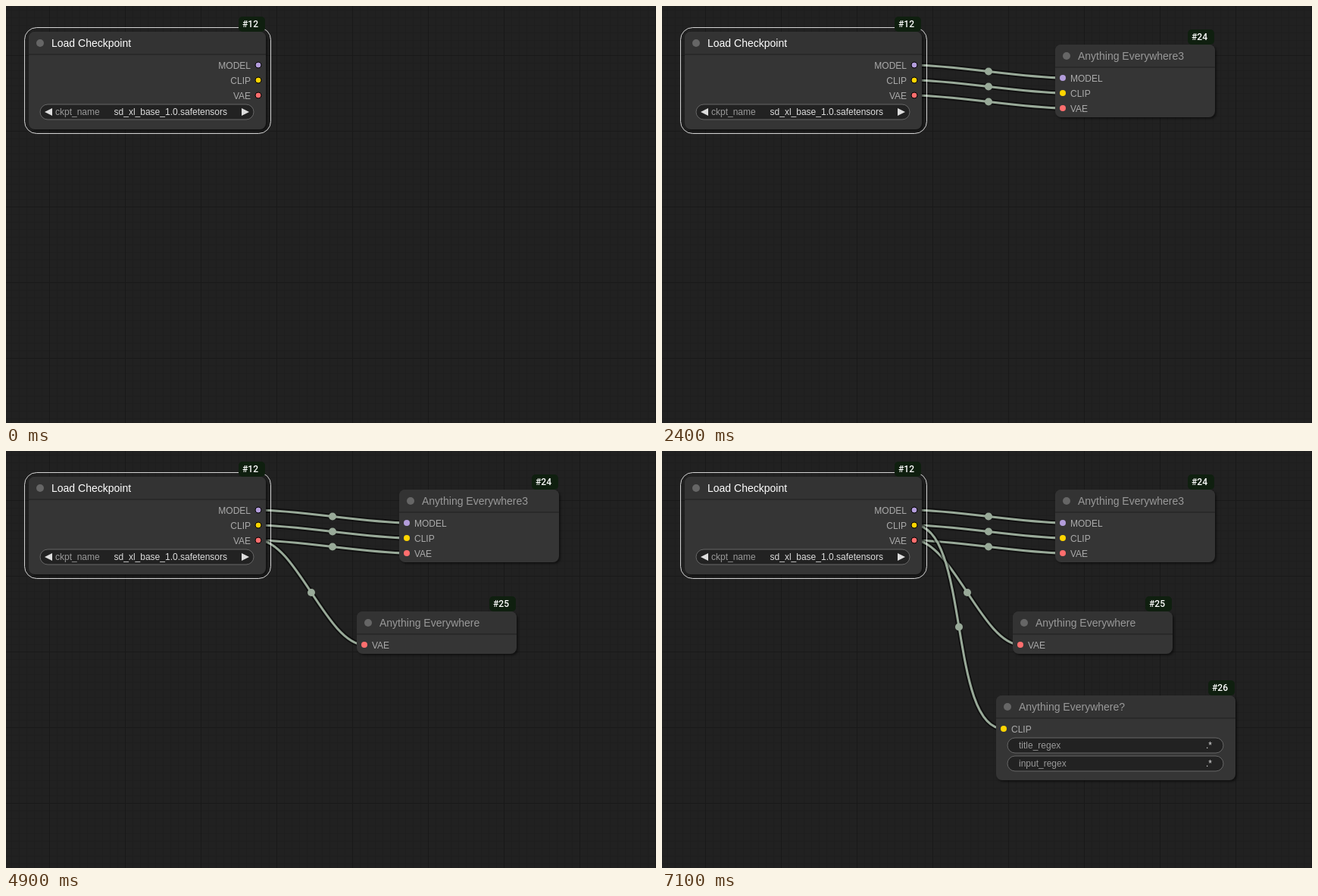
Write an HTML page with a canvas that moves like this. It is 858x551 px and loops after 8000 ms.

```html
<!DOCTYPE html>
<html lang="en">
<head>
<meta charset="utf-8">
<title>Node graph</title>
<style>
  html, body { margin: 0; width: 100%; height: 100%; overflow: hidden; background: #212121; }
  canvas { display: block; }
</style>
</head>
<body>
<canvas id="stage" width="858" height="551"></canvas>
<script>
const LOOP = 8000, STEP = 100;
const W = 858, H = 551, TITLE = 30;
const SANS = '"Liberation Sans", Arial, sans-serif';
const UI = 'Roboto, sans-serif';
const COLORS = { MODEL: '#b39ddb', CLIP: '#ffd500', VAE: '#ff6e6e' };
const LINK = '#99aa99', DRAG = '#aaffaa';
const ctx = document.getElementById('stage').getContext('2d');

// x, y is the corner below the title bar; each node appears at time "at".
const nodes = [
  { at: 0, x: 30, y: 64, w: 312, h: 99, id: '#12', title: 'Load Checkpoint', selected: true,
    outputs: ['MODEL', 'CLIP', 'VAE'],
    widgets: [{ y: 66, name: 'ckpt_name', value: 'sd_xl_base_1.0.safetensors', combo: true }] },
  { at: 2400, x: 519, y: 81, w: 210, h: 66, id: '#24', title: 'Anything Everywhere3',
    inputs: ['MODEL', 'CLIP', 'VAE'] },
  { at: 4600, x: 463, y: 242, w: 210, h: 26, id: '#25', title: 'Anything Everywhere',
    inputs: ['VAE'] },
  { at: 7100, x: 441, y: 353, w: 315, h: 82, id: '#26', title: 'Anything Everywhere?',
    inputs: ['CLIP'],
    widgets: [{ y: 26, name: 'title_regex', value: '.*' }, { y: 50, name: 'input_regex', value: '.*' }] }
];
const loader = nodes[0];

// Pointer positions, one per step; the last one holds until "end".
const drags = [
  { start: 900, end: 1500, slot: 0, path: [[352, 78], [400, 79], [455, 80], [500, 81], [519, 81]] },
  { start: 3600, end: 4000, slot: 2, path: [[360, 151], [402, 220], [438, 291], [463, 242]] },
  { start: 5700, end: 6300, slot: 1, path: [[352, 130], [383, 205], [415, 290], [436, 340], [441, 353]] }
];

// hover rows: [time, item, strength]
const menus = [
  { start: 1500, end: 2400, x: 509, y: 50,
    hover: [[1700, 0, .5], [1800, 0, 1], [2000, 1, .5], [2100, 2, .5], [2200, 2, 1]] },
  { start: 4000, end: 4600, x: 453, y: 211, hover: [[4200, 0, .5], [4300, 0, 1]] },
  { start: 6300, end: 7100, x: 431, y: 322, hover: [[6600, 1, .5], [6700, 1, 1]] }
];
const menuItems = ['Anything Everywhere', 'Anything Everywhere?', 'Anything Everywhere3'];
const tooltip = { start: 4800, end: 4900, x: 403, y: 187 };

const active = (span, t) => t >= span.start && t < span.end;
const slotY = (node, i) => node.y + 14 + 20 * i;
const outX = node => node.x + node.w - 9;

function rect(x, y, w, h, color) {
  ctx.fillStyle = color;
  ctx.fillRect(x, y, w, h);
}

function round(x, y, w, h, r, fill, stroke) {
  ctx.beginPath();
  ctx.roundRect(x, y, w, h, r);
  if (fill) { ctx.fillStyle = fill; ctx.fill(); }
  if (stroke) { ctx.strokeStyle = stroke; ctx.lineWidth = 1; ctx.stroke(); }
}

function dot(x, y, r, fill, stroke) {
  ctx.beginPath();
  ctx.arc(x, y, r, 0, 2 * Math.PI);
  ctx.fillStyle = fill;
  ctx.fill();
  if (stroke) { ctx.strokeStyle = stroke; ctx.lineWidth = 1; ctx.stroke(); }
}

function text(str, x, y, color, font, align = 'left') {
  ctx.font = font;
  ctx.textAlign = align;
  ctx.fillStyle = color;
  ctx.fillText(str, x, y);
}

function withShadow(color, blur, offset, draw) {
  ctx.save();
  ctx.shadowColor = color;
  ctx.shadowBlur = blur;
  ctx.shadowOffsetX = ctx.shadowOffsetY = offset;
  draw();
  ctx.restore();
}

function drawGrid() {
  rect(0, 0, W, H, '#212121');
  for (const [gap, color] of [[10, '#1e1e1e'], [100, '#191919']]) {
    for (let x = 57 % gap; x < W; x += gap) rect(x, 0, 1, H, color);
    for (let y = 65 % gap; y < H; y += gap) rect(0, y, W, 1, color);
  }
}

function drawLink(x1, y1, x2, y2, color, loose) {
  const pull = Math.hypot(x2 - x1, y2 - y1) / 4;
  ctx.beginPath();
  ctx.moveTo(x1, y1);
  ctx.bezierCurveTo(x1 + pull, y1, loose ? x2 : x2 - pull, y2, x2, y2);
  ctx.lineJoin = 'round';
  for (const [width, style] of [[7, 'rgba(0,0,0,.5)'], [3, color]]) {
    ctx.lineWidth = width;
    ctx.strokeStyle = style;
    ctx.stroke();
  }
  if (!loose) dot((x1 + x2) / 2, (y1 + y2) / 2, 5, color);
}

function drawLinks(node) {
  (node.inputs || []).forEach((name, i) => {
    const from = loader.outputs.indexOf(name);
    drawLink(outX(loader), slotY(loader, from), node.x + 10, slotY(node, i), LINK);
  });
}

function drawWidget(node, { y, name, value, combo }) {
  const left = node.x + 15, top = node.y + y, right = node.x + node.w - 15;
  const font = '12px ' + SANS;
  round(left, top, right - left, 20, 10, '#222', '#666');
  if (combo) {
    for (const [edge, dir] of [[left, 1], [right, -1]]) {
      ctx.beginPath();
      ctx.moveTo(edge + 16 * dir, top + 5);
      ctx.lineTo(edge + 6 * dir, top + 10);
      ctx.lineTo(edge + 16 * dir, top + 15);
      ctx.fillStyle = '#ddd';
      ctx.fill();
    }
  }
  text(name, left + (combo ? 20 : 15), top + 14, '#999', font);
  text(value, right - (combo ? 35 : 15), top + 14, '#ddd', font, 'right');
}

function drawNode(node) {
  const { x, y, w, h } = node, top = y - TITLE, font = '12px ' + SANS;
  withShadow('rgba(0,0,0,.5)', 3, 2, () => round(x, top, w + 1, h + TITLE, 8, '#353535'));
  round(x, top, w + 1, TITLE, [8, 8, 0, 0], '#333');
  rect(x, y - 1, w + 1, 2, 'rgba(0,0,0,.2)');
  dot(x + 15, y - 15, 5, '#666');
  text(node.title, x + 30, y - 10, node.selected ? '#fff' : '#999', '14px ' + SANS);
  if (node.selected) round(x - 5.5, top - 5.5, w + 13, h + TITLE + 11, 16, null, 'rgba(255,255,255,.8)');

  (node.inputs || []).forEach((name, i) => {
    dot(x + 10, slotY(node, i), 4, COLORS[name]);
    text(name, x + 20, slotY(node, i) + 5, '#aaa', font);
  });
  (node.outputs || []).forEach((name, i) => {
    dot(outX(node), slotY(node, i), 4, COLORS[name], '#000');
    text(name, outX(node) - 10, slotY(node, i) + 5, '#aaa', font, 'right');
  });
  (node.widgets || []).forEach(widget => drawWidget(node, widget));

  round(x + w - 35, top - 20, 35, 20, 5, '#0f1f0f');
  text(node.id, x + w - 30, top - 6, '#fff', '500 12px ' + UI);
}

function drawDrag({ start, slot, path }, t) {
  const [x, y] = path[Math.min(path.length - 1, Math.floor((t - start) / STEP))];
  const x0 = outX(loader), y0 = slotY(loader, slot);
  drawLink(x0, y0, x, y, DRAG, true);
  dot(x0, y0, 4, DRAG);
  dot(x, y, 4, DRAG);
}

function drawMenu({ x, y, hover }, t) {
  const [, current, strength] = hover.filter(row => row[0] <= t).pop() || [0, -1, 0];
  withShadow('#000', 10, 0, () => rect(x, y, 127, 81, '#2e2e2e'));
  rect(x, y, 127, 19, '#0f0f0f');
  text('UE Node', x + 2, y + 15, '#ddd', '12px ' + UI);
  menuItems.forEach((item, i) => {
    const on = i === current;
    if (on) rect(x + 2, y + 21, 0, 0, '#000');
    if (on) rect(x + 2, y + 21 + 20 * i, 123, 18, `rgba(74,74,74,${strength})`);
    text(item, x + 4, y + 35 + 20 * i, on ? '#fff' : '#ccc', (on ? '500 ' : '') + '12px ' + UI);
  });
}

function render(now) {
  const t = Math.floor((now % LOOP) / STEP) * STEP;
  const shown = nodes.filter(node => t >= node.at);
  drawGrid();
  shown.forEach(drawLinks);
  shown.forEach(drawNode);
  drags.filter(d => active(d, t)).forEach(d => drawDrag(d, t));
  if (active(tooltip, t)) dot(tooltip.x, tooltip.y, 3, '#000');
  menus.filter(m => active(m, t)).forEach(m => drawMenu(m, t));
}

const origin = performance.now();
function tick() {
  render(performance.now() - origin);
  requestAnimationFrame(tick);
}
tick();
</script>
</body>
</html>
```
